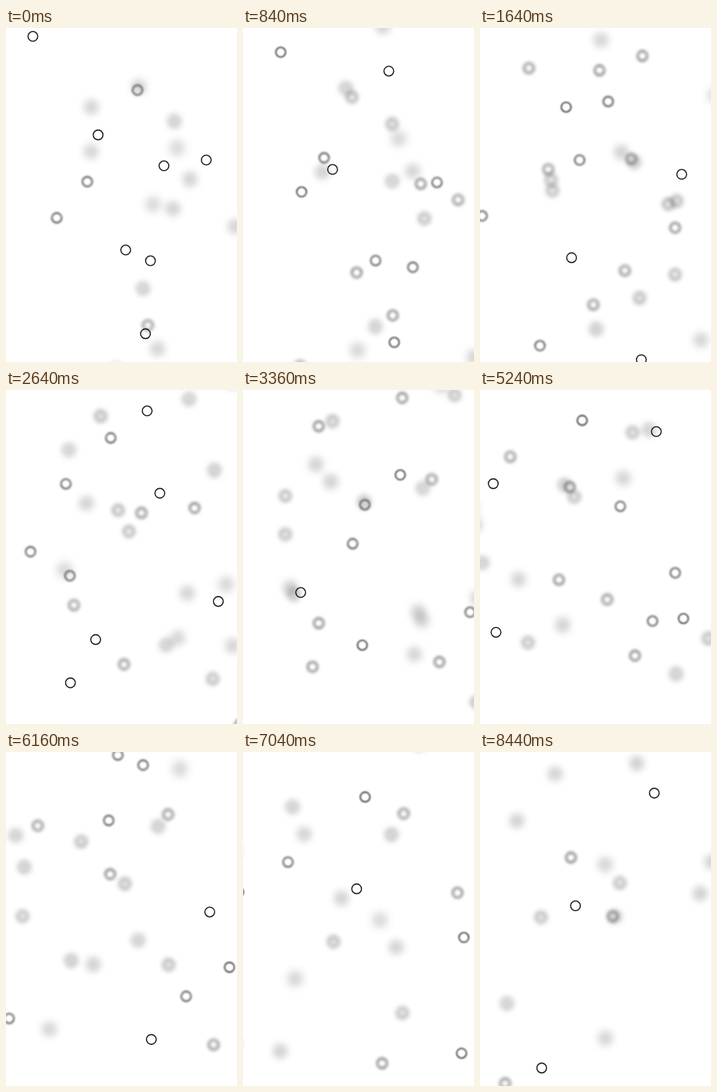
These frames come from a looping animation (332 px wide and 480 px high, 8.48 s). An HTML page with a canvas:

```html
<!DOCTYPE html>
<html lang="en">
<head>
<meta charset="utf-8">
<title>Drifting rings</title>
<style>
  html, body { margin: 0; width: 100%; height: 100%; overflow: hidden; background: #fff; }
  canvas { display: block; width: 332px; height: 480px; }
</style>
</head>
<body>
<canvas id="stage" width="332" height="480"></canvas>
<script>
const W = 332, H = 480, LOOP = 8.48;
const RADIUS = 7, LINE = 1.6, MAX_BLUR = 6.6, SHIFT = 8;
const EXTRAS = 16;
const ctx = document.getElementById('stage').getContext('2d');

// A ring drifts straight through (x, y), where it is sharp at `focus` seconds.
// Faster rings go in and out of focus more often.
function makeRing(x, y, focus, vx, vy) {
  const period = 11 - 0.13 * Math.hypot(vx, vy);
  return { x, y, focus, vx, vy, period };
}

const rings = [
  makeRing(130, 157, 0.1, -21, 37),
  makeRing(172, 319, 0, 20, 16),
  makeRing(227, 198, 0, 31, 28),
  makeRing(128, 204, 0.8, 16, -19),
  makeRing(133, 331, 1.6, -37, -24),
  makeRing(105, 122, 2.1, -38, 21),
  makeRing(16, 251, 2.1, 32, -38),
  makeRing(167, 87, 2.1, -34, -37),
  makeRing(196, 35, 2.45, 33, -29),
  makeRing(304, 303, 2.6, 27, 19),
  makeRing(130, 360, 2.6, -31, -36),
  makeRing(155, 153, 4.1, -25, -14),
  makeRing(138, 239, 4.1, -24, 27),
  makeRing(77, 69, 4.2, -35, 23),
  makeRing(261, 356, 4.4, -18, -31),
  makeRing(15, 139, 5.1, 26, -34),
  makeRing(278, 336, 5.6, -37, 24),
  makeRing(290, 235, 6, 15, -34)
];

function seeded(seed) {
  return () => (seed = (seed * 16807) % 2147483647) / 2147483647;
}

// The rest of the crowd: any place, heading and speed, spread over the loop.
const random = seeded(4711);
for (let i = 0; i < EXTRAS; i++) {
  const heading = 2 * Math.PI * random();
  const speed = 30 + 20 * random();
  const focus = LOOP * (i + 0.5) / EXTRAS;
  rings.push(makeRing(W * random(), H * random(), focus,
    speed * Math.cos(heading), speed * Math.sin(heading)));
}

// 0 in focus, 1 halfway to the next focus, linear between.
function defocus(ring, t) {
  const turns = (t - ring.focus) / ring.period;
  return 2 * Math.abs(turns - Math.round(turns));
}

// A ring grows from its top left corner, so blur also moves its centre.
function drawRing(ring, t) {
  const soft = defocus(ring, t);
  const age = t - ring.focus;
  const x = ring.x + ring.vx * age + SHIFT * soft;
  const y = ring.y + ring.vy * age + SHIFT * soft;
  const sigma = MAX_BLUR * soft;
  const reach = RADIUS + LINE + 3 * sigma;
  if (x < -reach || x > W + reach || y < -reach || y > H + reach) return;
  ctx.filter = sigma > 0.05 ? `blur(${sigma.toFixed(2)}px)` : 'none';
  ctx.beginPath();
  ctx.arc(x, y, RADIUS, 0, 2 * Math.PI);
  ctx.stroke();
}

const start = performance.now();

function draw() {
  const t = ((performance.now() - start) / 1000) % LOOP;
  ctx.filter = 'none';
  ctx.fillStyle = '#fff';
  ctx.fillRect(0, 0, W, H);
  ctx.strokeStyle = '#1c1b1d';
  ctx.lineWidth = LINE;
  for (const ring of rings) drawRing(ring, t);
  requestAnimationFrame(draw);
}
draw();
</script>
</body>
</html>
```
